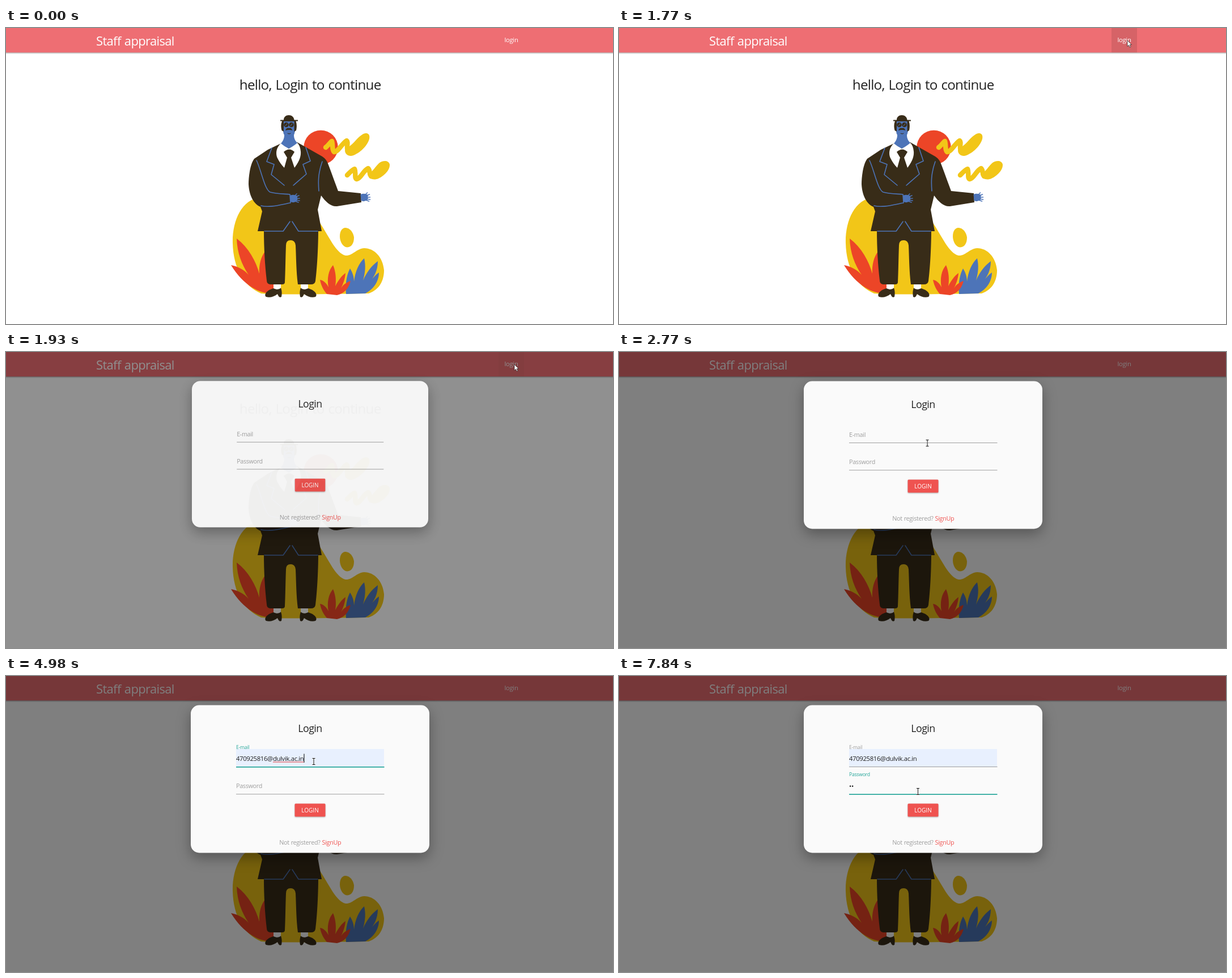
Write an HTML page that moves like this. It is 1071 px wide and 523 px high and loops after 7.99 s.

```html
<!DOCTYPE html>
<html lang="en">
<head>
<meta charset="utf-8">
<title>Staff appraisal</title>
<style>
  html, body { margin: 0; width: 100%; height: 100%; overflow: hidden; background: #fff; }
  svg { display: block; width: 100vw; height: 100vh; }
  text { font-family: "Open Sans", "Noto Sans", sans-serif; letter-spacing: -.03em; word-spacing: .05em; white-space: pre; }
  .mid { text-anchor: middle; }
  .ink { fill: #212121; }
  .dark { fill: #382c18; }
  .blue { fill: #4d74b8; }
  .red { fill: #ec4527; }
  .yellow { fill: #f2c618; }
  .seam { fill: none; stroke: #4d74b8; stroke-width: 1.6; stroke-linejoin: round; stroke-linecap: round; }
  .glint { stroke-width: 1; }
  .swirl { fill: none; stroke: #f2c618; stroke-width: 8.5; stroke-linecap: round; stroke-linejoin: round; }
  .field { font-size: 11.3px; }
  .label { font-size: 10.8px; }
  .entry { font-size: 8.6px; font-weight: 600; }
  .soft { filter: drop-shadow(0 1px 1px rgba(0,0,0,.3)); }
  #bar { filter: drop-shadow(0 1.2px .8px rgba(0,0,0,.4)); }
  #card { filter: drop-shadow(0 9px 12px rgba(0,0,0,.32)); }
</style>
</head>
<body>
<svg viewBox="0 0 1071 523">
  <defs>
    <g id="hand">
      <path class="blue" d="M501 296Q508 293 514 297V305Q508 310 502 307Z"/>
      <path class="seam" d="M509 297L513 293M512 298L517 296M513 301H518M512 304L518 305M510 306L516 308"/>
    </g>
    <g id="shoe">
      <path fill="#fff" d="M472 453H485V463H472Z"/>
      <path class="dark" d="M472 460C478 463 482 462 485 459C487 464 487 470 486 475Q483 477 481 474L479 470C473 475 465 477 459 475C455 472 458 464 472 460Z"/>
    </g>
  </defs>

  <rect width="1071" height="523" fill="#fff"/>
  <rect id="bar" x="-5" y="-5" width="1081" height="48.3" fill="#ee6e73"/>
  <rect id="hover" x="869" width="45" height="43.3" fill-opacity=".1"/>
  <text x="159" y="30.5" font-size="22" fill="#fff">Staff appraisal</text>
  <text class="mid" x="891.5" y="25.3" font-size="11.3" fill="#fff">login</text>
  <text class="mid ink" x="536.7" y="109" font-size="24.2">hello, Login to continue</text>

  <g id="picture">
    <path class="yellow" d="M450 300C415 301 399 343 400 380C401 425 420 456 450 469C490 472 560 470 640 469C660 462 667 445 667 428C665 405 650 389 632 389C618 390 611 403 599 402C582 398 570 368 553 343L540 320Z"/>
    <path class="yellow" d="M598 353C606 352 613 361 614 370C614 380 610 387 602 387.500C594 387 589 377 589 368C589 360 592 354 598 353Z"/>
    <circle class="red" cx="555.5" cy="211" r="30.3"/>
    <path class="swirl" d="M564 211C568 208 572 202 575 200C577 206 575 216 579 219C586 219 592 205 601 199C605 202 599 212 604 219
      M602 260C606 256 611 250 615 249C618 256 614 266 619 267C627 265 630 252 639 248C643 252 640 256 644 262"/>
    <path class="yellow" d="M598 216C598 224 606 228 613 225C624 221 638 208 641 196C643 186 636 184 629 188C620 193 614 204 606 209Z
      M638 258C640 268 650 269 657 266C668 261 678 250 677 241C675 233 664 234 658 239C651 246 648 252 643 255Z"/>
    <path class="red" d="M472 469C448 470 420 456 397 419C409 421 420 427 428 436C416 418 408 398 407 372C428 388 441 412 447 434C446 418 450 404 457 395L472 440Z"/>
    <path class="blue" d="M600 470C598 450 602 434 607 425C612 433 614 440 614 448C616 430 623 415 632 407C635 420 634 432 630 446C636 432 645 420 656 412C656 428 650 440 641 449C647 442 652 436 658 432C658 448 648 462 634 469Z"/>
    <path class="red" d="M566 470C560 463 556 455 554 445C561 446 566 452 569 458C566 443 569 428 577 419C582 430 583 445 581 456C586 446 592 438 599 433C598 444 595 452 591 460C595 453 601 449 608 447C604 462 596 469 584 472Z"/>
    <use href="#shoe"/>
    <use href="#shoe" transform="translate(1005) scale(-1 1)"/>
    <path class="dark" d="M455 356H551C551 385 549 425 546 447Q545 453 538 453H515C512 430 512 405 511 384Q510 375 502 375Q494 375 494 384C493 410 493 430 492 449Q492 453 487 453H466Q460 452 460 446C457 420 455 390 455 356Z"/>
    <path class="dark" d="M485 204L462 215L438 231C431 240 428 262 428 276C429 296 437 311 449 316L452 324L444 359H557L550 321L556 296C564 307 573 316 584 315L627 308L626 292L586 288C580 272 574 255 569 242Q566 232 558 227L514 202Z"/>
    <path class="seam" d="M442 234C450 250 456 285 466 290C476 293 488 293 501 294L502 309C485 312 465 318 450 314
      M469 212L460 236L473 241L468 259L491 278M529 211L537 235L524 241L530 258L507 278
      M558 236C550 258 551 275 552 288M456 359H489L501 342M505 342L516 359H550"/>
    <use href="#hand"/>
    <use href="#hand" x="124.500" y="-2"/>
    <path fill="#fff" d="M486 203C477 210 475 222 479 230Q484 240 491 247L496 229L490 219Q500 210 509 219L503 229L509 247C516 238 521 228 520 218Q519 207 513 202L499 213Z"/>
    <path class="blue" d="M489 163H510V182Q509 187 508 189C508 195 510 199 514 203Q507 209 499 213Q492 210 485 204C489 199 491 195 491 189Q489 186 489 182Z"/>
    <path class="dark" d="M484 162.500H490C490 157 494 154 499 154S508 157 508.500 162.500H515V164.500H511.500Q514 172 512 181L508.500 183V165H490V183L486.500 181Q484 172 487 164.500H484Z"/>
    <path class="dark" d="M493 181C494 177 497 176 499.500 177C502 176 504 177 505.500 181Q499.500 179 493 181Z"/>
    <circle class="dark" cx="494.5" cy="171" r="4.3"/>
    <circle class="dark" cx="503.5" cy="171" r="4.3"/>
    <path class="seam glint" d="M493 173L496 169M502 173L505 169"/>
    <path d="M497 186Q499.500 188 502 186" fill="none" stroke="#382c18" stroke-width="1.2"/>
  </g>

  <rect id="shade" width="1071" height="523"/>

  <g id="modal">
    <rect id="card" x="326" y="51.5" width="421" height="261" rx="15" fill="#fafafa"/>
    <text class="mid ink" x="536.5" y="98.8" font-size="17.8">Login</text>
    <rect id="tint" x="406" y="129" width="261" height="31.500" fill="#e8f0fe"/>
    <text id="mailLabel" class="label">E-mail</text>
    <text id="mail" class="field ink" x="406" y="150"></text>
    <path id="wave" fill="none" stroke="#e03c3c"/>
    <rect id="mailLine" x="406" width="261.500"/>
    <text id="passLabel" class="label">Password</text>
    <text id="pass" class="field ink" x="406" y="198.500"></text>
    <rect id="passLine" x="406" width="261.500"/>
    <rect class="soft" x="509.5" y="225.500" width="54" height="23" rx="1.500" fill="#ef5350"/>
    <text class="mid" x="536.5" y="241.300" font-size="10" fill="#fff" style="letter-spacing:0">LOGIN</text>
    <text class="mid" x="536.7" y="298.300" font-size="10.8" fill="#9e9e9e">Not registered? <tspan fill="#ef5350">SignUp</tspan></text>
    <rect id="caret" width="1" height="15.500"/>
    <g id="pane">
      <rect id="paneBox" class="soft" width="261.500" rx="2" fill="#fff"/>
      <rect id="row" y="5" width="261" height="25" fill="#eee"/>
      <text id="entry" class="entry ink" x="8" y="20.500"></text>
      <g id="more">
        <text class="entry" x="8" y="34" fill="#757575">••••••••</text>
        <path d="M0 53.500H261" stroke="#e0e0e0"/>
        <text class="entry ink" x="8" y="72">Manage passwords…</text>
      </g>
    </g>
  </g>

  <path id="arrow" d="M0 0V10.500L2.500 8.200L4.200 12L6 11.200L4.300 7.500H7.500Z" fill="#fff" stroke="#222" stroke-width=".7"/>
  <g id="beam" fill="none">
    <path d="M-2.500 -5.500H2.500M0 -5.500V5.500M-2.500 5.500H2.500" stroke="#fff" stroke-width="2"/>
    <path d="M-2.500 -5.500H2.500M0 -5.500V5.500M-2.500 5.500H2.500" stroke="#111"/>
  </g>
</svg>
<script>
const LOOP = 7990, BLINK = 530;
const MAIL = "470925816@dulvik.ac.in";
const TEAL = "#26a69a", GREY = "#9e9e9e";

// The screen repaints only at these moments during the quick changes.
const REPAINTS = [1700, 1770, 1860, 1930, 2030, 3320, 3400, 3470, 3550, 6900, 6980, 7050, 7130, 7200, 7280];
const CARET_STARTS = [3320, 3570, 4980, 6900, 7310];

// Pointer moves: start, end, steps, target x, target y
const MOVES = [
  [370, 600, 4, 829, 97],
  [920, 1300, 6, 897, 22],
  [2030, 2460, 7, 545.5, 174],
  [2540, 3000, 7, 543, 151],
  [5660, 5950, 5, 624, 224],
  [6030, 6430, 6, 528, 206],
  [6500, 6580, 2, 527.5, 204]
];

const el = {};
document.querySelectorAll("svg [id]").forEach(n => el[n.id] = n);
el.entry.textContent = MAIL;

const set = (n, attrs) => { for (const k in attrs) n.setAttribute(k, attrs[k]); };
const show = (n, on) => n.setAttribute("visibility", on ? "inherit" : "hidden");
const clamp = v => Math.min(1, Math.max(0, v));
const easeOut = (u, power) => 1 - (1 - clamp(u)) ** power;
const lastOf = (list, t) => list.reduce((a, v) => v <= t ? v : a, 0);

function pointerAt(t) {
  let x = 953, y = 465;
  for (const [from, to, n, tx, ty] of MOVES) {
    if (t < from) break;
    const step = Math.min(n, Math.floor((t - from) / (to - from) * (n - 1) + 1e-6) + 1);
    x += (tx - x) * step / n;
    y += (ty - y) * step / n;
  }
  return [x, y];
}

function drawPointer(t) {
  const [x, y] = pointerAt(t);
  const inField = x > 406 && x < 667 && (y > 129 && y < 161 || y > 177 && y < 210);
  show(el.arrow, t >= 370 && !inField);
  show(el.beam, t >= 370 && inField);
  set(inField ? el.beam : el.arrow, { transform: `translate(${x} ${y})` });
}

function drawModal(t) {
  const u = (t - 1806) / 194, e = easeOut(u, 3);
  set(el.shade, { opacity: easeOut(u, 2) / 2 });
  set(el.modal, {
    opacity: e,
    transform: `translate(536.5 ${182 - 31 * (1 - e)}) scale(${.8 + .2 * e}) translate(-536.5 -182)`
  });
  show(el.modal, u > 0);
  set(el.hover, { opacity: t < 1700 ? 0 : t < 1770 ? .5 : t < 1930 ? 1 : t < 2030 ? .3 : 0 });
}

function drawField(name, base, lift, focused) {
  set(el[name + "Label"], {
    transform: `translate(406 ${base - 21.3 * lift}) scale(${1 - .2 * lift})`,
    fill: focused ? TEAL : GREY
  });
  set(el[name + "Line"], { y: base + 10, height: focused ? 1.7 : 1, fill: focused ? TEAL : GREY });
}

function drawForm(t, now) {
  const inMail = t >= 3320 && t < 6900, inPass = t >= 6900;
  drawField("mail", 150, easeOut((t - 3280) / 200, 2), inMail);
  drawField("pass", 198.3, easeOut((t - 6860) / 200, 2), inPass);

  const typed = t < 3470 ? 0 : t < 3550 ? 1 : t < 4720 ? 2 : MAIL.length;
  const dots = t < 7200 ? 0 : t < 7280 ? 1 : 2;
  el.mail.textContent = MAIL.slice(0, typed);
  el.pass.textContent = "•".repeat(dots);
  show(el.tint, t >= 4720);

  const checked = t >= 4980 && inMail;
  show(el.wave, checked);
  if (checked) {
    const from = el.mail.getStartPositionOfChar(10).x, to = 406 + el.mail.getComputedTextLength();
    set(el.wave, { d: `M${from} 152H${to}` });
  }

  const lit = Math.floor((now - lastOf(CARET_STARTS, now)) / BLINK) % 2 === 0;
  const value = inPass ? el.pass : el.mail;
  show(el.caret, t >= 3320 && lit && (t < 4720 || t >= 4980));
  set(el.caret, {
    x: 406 + (value.textContent ? value.getComputedTextLength() : 0),
    y: inPass ? 186 : 137.5
  });

  const tall = inMail && t < 3470 || inPass && !dots;
  show(el.pane, inMail && t < 4980 || tall);
  show(el.more, tall);
  show(el.row, t >= 4650 && t < 4980);
  set(el.pane, { transform: `translate(406 ${inPass ? 211.5 : 163})` });
  set(el.paneBox, { height: tall ? 82 : 35.5 });
}

function frame(ms) {
  const now = ms % LOOP;
  // Hold quick changes at their last repaint.
  const held = lastOf(REPAINTS, now);
  const t = held && now - held < 100 ? held : now;
  drawPointer(now);
  drawModal(t);
  drawForm(t, now);
}

const start = performance.now();
function tick() {
  frame(performance.now() - start);
  requestAnimationFrame(tick);
}
tick();
</script>
</body>
</html>
```
